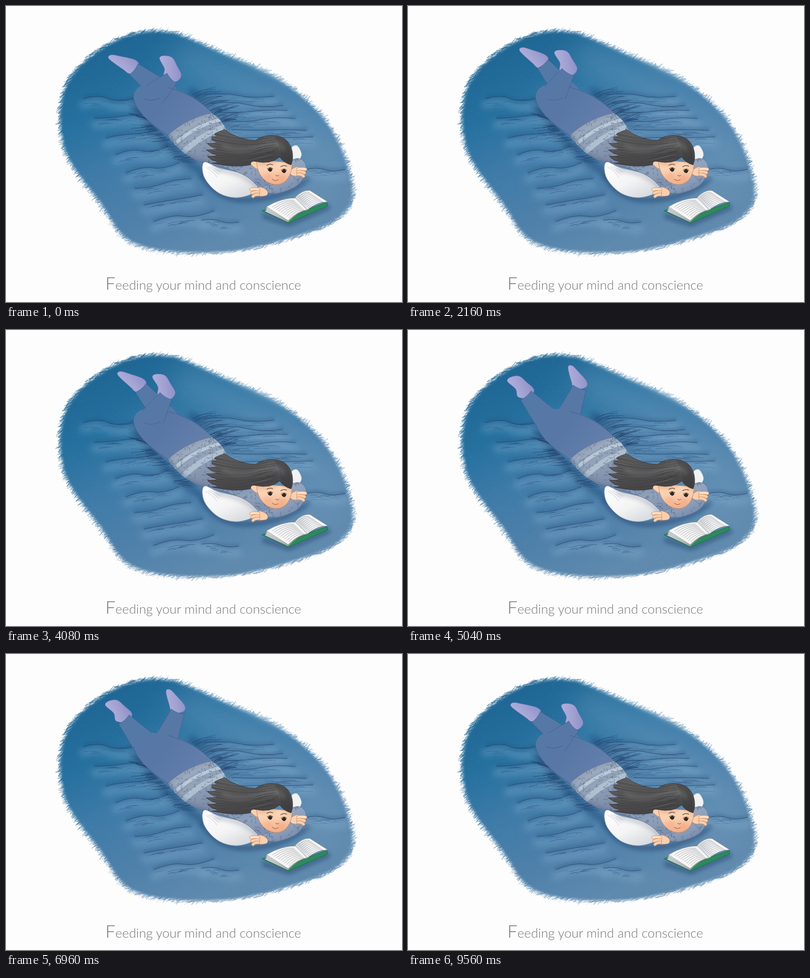
Write an HTML page with a canvas that moves like this. It is 800 px wide and 600 px high and loops after 9.6 s.

```html
<!DOCTYPE html>
<html lang="en">
<head>
<meta charset="utf-8">
<title>Feeding your mind and conscience</title>
<style>
  html, body { margin: 0; width: 100%; height: 100%; overflow: hidden; background: #fdfdfd; }
  canvas { position: absolute; left: 0; top: 0; width: 800px; height: 600px; }
  p {
    position: absolute; left: 0; top: 537px; width: 797px; margin: 0;
    text-align: center; white-space: nowrap;
    font: 300 26.2px/48px Lato, "Open Sans", sans-serif; color: #747474;
  }
  p::first-letter { font-size: 36px; }
</style>
</head>
<body>
<canvas id="stage" width="800" height="600"></canvas>
<p>Feeding your mind and conscience</p>
<script>
const W = 800, H = 600, TAU = Math.PI * 2, DEG = TAU / 360;
const stage = document.getElementById('stage').getContext('2d');

let seed = 7;
const rnd = () => (seed = (seed * 16807) % 2147483647) / 2147483647;
const span = (a, b) => a + (b - a) * rnd();
const mix = (a, b, t) => a + (b - a) * t;
const lerp = (p, q, t) => [mix(p[0], q[0], t), mix(p[1], q[1], t)];

function layer() {
  const c = document.createElement('canvas');
  c.width = W; c.height = H;
  const g = c.getContext('2d');
  g.lineCap = 'round';
  return g;
}

// Point at u (0..1) on the closed Catmull-Rom curve through flat x,y keys.
function along(keys, u) {
  const n = keys.length / 2, i = Math.floor(u * n), t = u * n - i;
  return [0, 1].map(d => {
    const [a, b, c, e] = [-1, 0, 1, 2].map(k => keys[((i + k + n) % n) * 2 + d]);
    return b + t / 2 * (c - a + t * (2 * a - 5 * b + 4 * c - e + t * (3 * (b - c) + e - a)));
  });
}

function smooth(...keys) {
  const p = new Path2D(), steps = keys.length * 6;
  for (let i = 0; i < steps; i++) p.lineTo(...along(keys, i / steps));
  p.closePath();
  return p;
}

const path = p => typeof p === 'string' ? new Path2D(p) : p;

function grad(g, x0, y0, x1, y1, ...cols) {
  const f = g.createLinearGradient(x0, y0, x1, y1);
  cols.forEach((c, i) => f.addColorStop(i / (cols.length - 1), c));
  return f;
}

function ink(g, p, color, width = 1) {
  g.strokeStyle = color; g.lineWidth = width;
  g.stroke(path(p));
}

function paint(g, p, fill, edge) {
  p = path(p);
  g.fillStyle = fill; g.fill(p);
  if (edge) ink(g, p, edge, .9);
  return p;
}

function clipped(g, p, draw) {
  g.save(); g.clip(p); draw(); g.restore();
}

function soft(g, p, color, width, blur) {
  g.save();
  g.filter = `blur(${blur}px)`;
  ink(g, p, color, width);
  g.restore();
}

/* ---------- blanket ---------- */
const rim = [114,195, 150,124, 235,66, 330,55, 440,98, 555,152, 648,238, 693,340,
  688,410, 610,458, 440,498, 265,482, 190,396, 122,295];

function bristles(g) {
  for (let i = 0; i < 2600; i++) {
    const [x, y] = along(rim, i / 2600);
    const len = span(2, 7), a = -.5 + span(-.5, .5), ox = span(-5, 5), oy = span(-5, 5);
    const dx = Math.cos(a) * len, dy = Math.sin(a) * len;
    ink(g, `M${x + ox - dx} ${y + oy - dy}l${2 * dx} ${2 * dy}`, `rgba(0,0,0,${span(.15, .7)})`, span(.5, 1.8));
  }
}

// A crease from p to q: dark valley, light slope below it and fine hairs beside it.
function crease(g, p, q, sag) {
  const [cx, cy] = lerp(p, q, .5), w = q[0] - p[0], h = q[1] - p[1];
  const line = dy => `M${p[0]} ${p[1] + dy}q${w * .3} ${h * .3 - sag} ${cx - p[0]} ${cy - p[1]}T${q[0]} ${q[1] + dy}`;
  soft(g, line(13), 'rgba(140,180,212,.36)', 15, 7);
  soft(g, line(-2), 'rgba(20,62,112,.38)', 4, 3);
  ink(g, line(0), 'rgba(24,48,88,.65)', 1);
  for (let i = 0; i < 11; i++) {
    const [x, y] = lerp(p, q, rnd() * .75), l = span(.1, .28), dy = span(3, 16);
    ink(g, `M${x} ${y + dy}q${w * l / 2} ${h * l / 2 - 3} ${w * l} ${h * l}`,
      `rgba(26,58,104,${span(.2, .55)})`, span(.5, 1));
  }
}

// Dark hairs springing from the seam p-q.
function fringe(g, p, q, dx, dy, n) {
  for (let i = 0; i < n; i++) {
    const [x, y] = lerp(p, q, rnd()), k = span(.4, 1.2);
    ink(g, `M${x} ${y}q${dx * k * .4} ${dy * k * .9} ${dx * k} ${dy * k + span(-5, 5)}`,
      `rgba(20,48,92,${span(.2, .6)})`, span(.5, 1.3));
  }
}

function drawBlanket() {
  const g = layer();
  g.filter = 'blur(2px)';
  g.fill(smooth(...rim));
  g.filter = 'none';
  bristles(g);
  g.globalCompositeOperation = 'destination-out';
  soft(g, 'M360 48Q480 104 570 150T680 262', 'rgba(0,0,0,.5)', 12, 7);
  g.globalCompositeOperation = 'source-in';
  g.fillStyle = grad(g, 230, 70, 410, 490, '#1f6694', '#25709f', '#3f7ba8', '#4e80aa', '#5f8aae');
  g.fillRect(0, 0, W, H);
  g.globalCompositeOperation = 'source-atop';
  soft(g, 'M370 110Q510 160 650 290', 'rgba(125,165,198,.38)', 70, 28);
  soft(g, 'M300 205Q430 340 640 350', 'rgba(125,165,198,.3)', 80, 28);
  soft(g, 'M258 195Q300 270 400 340', 'rgba(18,56,104,.5)', 14, 7);
  soft(g, 'M375 175Q425 200 450 245', 'rgba(18,56,104,.5)', 14, 7);
  soft(g, 'M397 345Q430 400 500 393T610 350M522 426L572 442L650 408', 'rgba(24,56,100,.5)', 10, 5);

  for (let i = 0; i < 8; i++) {
    const t = i / 7;
    crease(g, lerp([160, 194], [300, 440], t + span(-.03, .03)), lerp([258, 187], [420, 415], t), span(-6, 10));
  }
  for (let i = 0; i < 6; i++) {
    const t = i / 5;
    crease(g, lerp([400, 180], [470, 268], t), lerp([540, 182], [620, 265], t + span(-.06, .06)), span(-6, 8));
  }
  crease(g, [603, 332], [685, 331], 6);
  crease(g, [395, 434], [470, 438], 5);
  fringe(g, [290, 238], [390, 320], -38, 4, 55);
  fringe(g, [262, 205], [300, 246], -30, -6, 16);
  fringe(g, [375, 180], [450, 250], 44, -14, 55);

  for (let i = 0; i < 9000; i++) {
    g.fillStyle = rnd() < .5 ? 'rgba(255,255,255,.06)' : 'rgba(0,20,60,.06)';
    g.fillRect(rnd() * W, rnd() * H, 1.2, 1.2);
  }
  return g.canvas;
}

/* ---------- jumper, pillow, head, book ---------- */
function knit(g, shape, x, y, w, h) {
  clipped(g, shape, () => {
    for (let i = 0; i < w * h / 70; i++) {
      const a = rnd() * TAU, l = span(3, 6);
      ink(g, `M${x + rnd() * w} ${y + rnd() * h}l${Math.cos(a) * l} ${Math.sin(a) * l}`, 'rgba(62,76,106,.6)', .9);
    }
  });
}

function drawJumper(g) {
  const trunk = paint(g, 'M327 262Q366 227 416 217Q440 234 444 252L490 340L415 322Q360 312 327 262Z',
    grad(g, 350, 230, 390, 320, '#96a5bb', '#8f9fb6', '#7c8ca8'), '#5d7194');
  clipped(g, trunk, () => {
    ['#8f96a8', '#9aa9bd', '#b9c9d8', '#93a3b8', '#aebfd0'].forEach((c, i) =>
      ink(g, `M${322 + i * 8} ${264 + i * 9}Q${368 + i * 7} ${226 + i * 8} ${420 + i * 7} ${216 + i * 7}`, c, i % 2 ? 7 : 2 + i * 2.4));
    soft(g, 'M330 270Q360 312 415 324', 'rgba(60,82,125,.4)', 10, 5);
  });
  knit(g, trunk, 327, 217, 118, 110);
}

function drawPillow(g) {
  paint(g, smooth(576,290, 588,283, 597,302, 584,318), '#f1f2f4', '#a9b5c6');
  const body = paint(g, smooth(400,317, 401,348, 430,379, 470,388, 508,372, 490,345, 430,328),
    grad(g, 420, 330, 450, 395, '#fbfbfb', '#f4f4f4', '#dadde2'), '#a9b3c2');
  clipped(g, body, () => {
    soft(g, 'M425 331Q485 338 510 370', 'rgba(120,130,150,.4)', 8, 4);
    for (let i = 0; i < 4; i++)
      ink(g, `M${404 + i * 4} ${327 - i}q14 ${8 - i} 22 ${20 - i * 4}`, 'rgba(130,140,155,.5)', .8);
  });
}

function drawArms(g) {
  const left = paint(g, smooth(412,316, 455,314, 500,318, 538,366, 522,376, 488,347, 450,330),
    grad(g, 470, 315, 480, 365, '#8094b1', '#8fa1ba', '#7f91ae'), '#60749a');
  const right = paint(g, smooth(580,312, 600,313, 606,334, 588,364, 545,380, 515,370, 560,345),
    grad(g, 560, 325, 585, 380, '#93a6c0', '#8a9db9', '#7186a8'), '#60749a');
  knit(g, left, 414, 314, 125, 62);
  knit(g, right, 514, 308, 95, 72);
}

const SKIN = ['#fde0c6', '#f9cfae', '#efab84'], LINE = '#c98560';

// Palm at x,y with three fingers; k = 1 points right, -1 left.
function hand(g, x, y, k) {
  const palm = smooth(x - 15,y, x,y - 9, x + 15,y - 2, x + 14,y + 8, x - 8,y + 9);
  paint(g, palm, SKIN[1], LINE);
  for (let i = 0; i < 3; i++) {
    const finger = `M${x + k * 2} ${y - 4 + i * 5}q${k * 8} ${-2 + i} ${k * (15 - i * 2)} ${i * 2}`;
    ink(g, finger, LINE, 6.5);
    ink(g, finger, SKIN[i && 1], 5);
  }
}

function drawHair(g) {
  const p = new Path2D('M441 250C455 262 484 273 505 272C520 259 556 258 570 276C582 292 580 312 576 322' +
    'Q561 318 553 306Q535 322 503 315Q494 313 494 322Q460 329 415 318');
  for (let i = 1; i < 6; i++) {
    const t = i / 5, y = 318 - 66 * t;
    p.quadraticCurveTo(432, y + 13, 424, y + 10);
    p.quadraticCurveTo(414, y + 8, 412 - 8 * Math.sin(Math.PI * t) + 26 * t ** 5, y);
  }
  p.closePath();
  paint(g, p, grad(g, 490, 260, 500, 325, '#5d5c5d', '#504f50', '#434244'), '#39383b');
  clipped(g, p, () => {
    soft(g, 'M440 285Q475 300 512 284T560 290', 'rgba(160,160,160,.4)', 7, 4);
    for (let i = 0; i < 60; i++) {
      const t = i / 59;
      ink(g, `M${span(516, 554)} ${mix(263, 306, t)}C500 ${mix(270, 314, t)} 465 ${mix(266, 324, t)} ${span(406, 425)} ${mix(250, 319, t)}`,
        i % 3 ? `rgba(28,27,30,${span(.15, .45)})` : 'rgba(160,160,160,.28)', span(.5, 1));
    }
    for (let i = 0; i < 10; i++)
      ink(g, `M${542 + i * 2} 264q16 18 15 56`, 'rgba(30,29,32,.35)', .7);
  });
}

function drawHead(g) {
  paint(g, smooth(508,314, 496,312, 494,320, 508,330), SKIN[1], LINE);
  const face = paint(g, 'M506 312C506 339 522 361 546 362C566 361 577 345 578 318Z',
    grad(g, 540, 305, 546, 364, ...SKIN), LINE);
  clipped(g, face, () => soft(g, 'M506 316Q535 322 553 306L578 322', 'rgba(214,130,90,.5)', 8, 4));
  for (const x of [534, 562]) {
    const y = 332 + (x - 534) / 10;
    soft(g, `M${x - 8} ${y + 13}h6`, 'rgba(244,140,110,.4)', 9, 4);
    paint(g, smooth(x - 5,y, x,y - 4, x + 4,y, x,y + 4), '#2f2722');
    ink(g, `M${x - 6} ${y - 2}q6 -5 11 0m-12 -7q6 -4 12 -1`, '#3c2f29', 1.1);
  }
  ink(g, 'M545 343q3 3 6 0M538 351q6 5 12 1', '#b5694c', 1.2);
  drawHair(g);
}

// A bulging sheet between spine (a to b) and outer edge (d to c), with lines of writing.
function page(g, a, b, c, d, fill) {
  const row = t => {
    const p = lerp(a, b, t), q = lerp(d, c, t), m = lerp(p, q, .5);
    return [p, [m[0], m[1] - 9], q];
  };
  const [top, low] = [row(0), row(1)];
  paint(g, `M${top[0]}Q${top[1]} ${top[2]}L${low[2]}Q${low[1]} ${low[0]}Z`, fill, '#8d9197');
  for (let i = 1; i < 10; i++) {
    const [p, m, q] = row(i / 10);
    ink(g, `M${lerp(p, q, .12)}Q${m} ${lerp(p, q, .86)}`, 'rgba(110,114,122,.6)', .9);
  }
}

function drawBook(g) {
  paint(g, 'M517 415L526 412L568 432L610 412L649 398L650 405L571 440Z', '#2c8a5c', '#1d6a48');
  for (let i = 3; i >= 0; i--)
    page(g, [586, 389], [609, 413], [570, 435 + i], [526 - i, 407 + i * 3], i ? '#dcdfe2' : '#f6f6f6');
  page(g, [584, 388], [609, 413], [650, 397], [614, 374], grad(g, 595, 395, 635, 380, '#d7dadd', '#fafafa', '#fff'));
}

function drawFront() {
  const g = layer();
  drawJumper(g);
  drawPillow(g);
  drawArms(g);
  hand(g, 588, 335, 1);
  hand(g, 512, 376, -1);
  drawHead(g);
  drawBook(g);
  return g.canvas;
}

/* ---------- legs ---------- */
// Pairs hold the value with legs crossed and with legs nearly apart.
const near = {
  knee: [288, 190], r: 28, angle: [47, -41], len: [64, 76], foot: [-18, -39], size: [1, 1],
  sock: smooth(-11,-46, 0,-48, 14,-39, 18,-20, 20,1, 4,9, -14,-7, -8,-23)
};
const far = {
  knee: [322, 178], r: 24, angle: [-52, 22], len: [81, 66], foot: [-63, -25], size: [1.04, .9],
  sock: smooth(-4,-52, 5,-52, 11,-35, 18,-6, 11,5, -11,-2, -10,-19)
};
const CUFF = 14;
const trousers = grad(stage, 250, 130, 400, 240, '#5479a7', '#5877a5', '#657fac');
const sockFill = grad(stage, -14, -20, 20, -10, '#aeadd9', '#a1a2d2', '#9293c8');
const thigh = path('M258 188C262 210 285 235 327 262Q366 227 416 217C396 194 370 177 330 164L290 159C270 158 257 170 258 188Z');

function drawLeg(g, leg, s) {
  const t = (1 - s) / 1.707, at = pair => mix(...pair, t);
  const a = at(leg.angle) * DEG, dx = Math.sin(a), dy = -Math.cos(a);
  const [kx, ky] = leg.knee, ax = kx + dx * at(leg.len), ay = ky + dy * at(leg.len);

  g.save();
  g.translate(ax, ay);
  g.rotate(at(leg.foot) * DEG);
  g.scale(1, at(leg.size));
  paint(g, leg.sock, sockFill, 'rgba(112,112,176,.5)');
  g.restore();

  const side = (x, y, w) => [x - dy * w, y + dx * w];
  const hem = `${side(ax, ay, -CUFF)}Q${ax - dx * 4} ${ay - dy * 4} ${side(ax, ay, CUFF)}`;
  const shin = new Path2D();
  shin.arc(kx, ky, leg.r, a, a + Math.PI);
  shin.addPath(path(`M${side(kx, ky, -leg.r)}L${hem}L${side(kx, ky, leg.r)}Z`));
  paint(g, shin, trousers);
  const from = k => lerp(side(kx, ky, k * leg.r), side(ax, ay, k * CUFF), .25);
  ink(g, `M${from(-1)}L${hem}L${from(1)}`, 'rgba(58,86,138,.6)');
}

const back = drawBlanket(), front = drawFront();

function frame() {
  const time = Math.floor(performance.now() / 40) * 40;
  const s = Math.cos(time % 1920 / 1920 * TAU);
  stage.fillStyle = '#fdfdfd';
  stage.fillRect(0, 0, W, H);
  stage.drawImage(back, 0, 0);
  drawLeg(stage, far, s);
  paint(stage, thigh, trousers);
  drawLeg(stage, near, s);
  ink(stage, 'M258 188C262 210 285 235 327 262M326 165Q375 176 414 214', 'rgba(52,78,130,.55)');
  ink(stage, 'M279 188Q294 195 312 186', `rgba(50,76,128,${.6 * Math.max(0, s)})`);
  stage.drawImage(front, 0, 0);
  requestAnimationFrame(frame);
}
frame();
</script>
</body>
</html>
```
